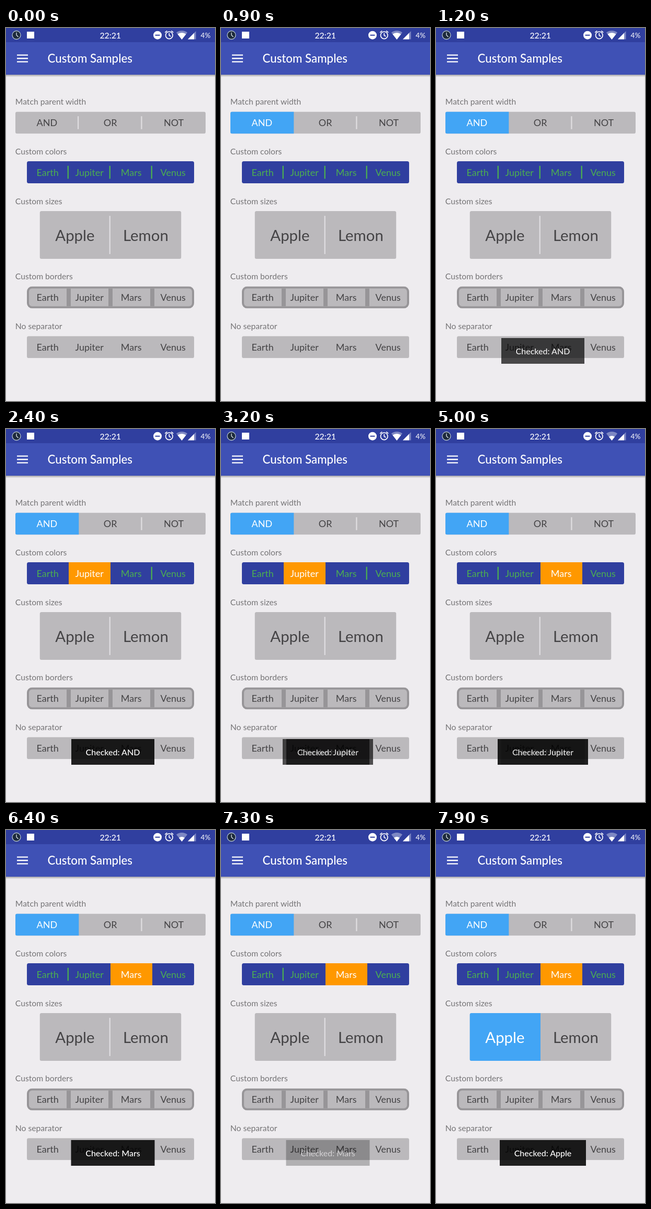
These frames come from a looping animation (400 px wide and 711 px high, 8000 ms). An HTML page:

```html
<!DOCTYPE html>
<html lang="en">
<head>
<meta charset="utf-8">
<title>Custom Samples</title>
<style>
  html, body { margin: 0; width: 100%; height: 100%; overflow: hidden; background: #eeecef; }
  svg { display: block; width: 100vw; height: 100vh; font-family: Lato, sans-serif; }
  .mid { text-anchor: middle; }
</style>
</head>
<body>
<svg viewBox="0 0 400 711">
  <defs>
    <linearGradient id="shade" x2="0" y2="1">
      <stop offset="0" stop-opacity=".3"/>
      <stop offset="1" stop-opacity="0"/>
    </linearGradient>
  </defs>
  <rect width="400" height="711" fill="#eeecef"/>
  <rect y="89" width="400" height="4.5" fill="url(#shade)"/>
  <rect width="400" height="89" fill="#3f51b5"/>
  <rect width="400" height="27" fill="#303f9f"/>

  <!-- status bar -->
  <circle cx="20" cy="13.5" r="8" fill="#1d2a3c" stroke="#b4c4cc" stroke-width="1.3"/>
  <path d="M20 8.5V13.5L23.5 17" fill="none" stroke="#dfe8ea" stroke-width="1.3"/>
  <rect x="40" y="7" width="14" height="13" fill="#fff"/>
  <text class="mid" x="199.7" y="19.5" font-size="15.8" font-weight="500" fill="#fff">22:21</text>
  <circle cx="290" cy="13.7" r="8" fill="#fff"/>
  <path d="M285.5 13.7H294.5" stroke="#303f9f" stroke-width="2"/>
  <g fill="none" stroke="#fff" stroke-width="1.7">
    <circle cx="312.3" cy="13.8" r="6.8"/>
    <path d="M312.3 9.8V14L315.3 16M304.3 8.7L308.3 5.4M316.3 5.4L320.3 8.7"/>
  </g>
  <g fill="#fff">
    <path id="wifiBack" opacity=".38"/>
    <path id="wifi"/>
    <path d="M348 21.5H363.5V6Z" opacity=".38"/>
    <path d="M348 21.5H360V9.5Z"/>
    <text x="372.5" y="18.8" font-size="13.6">4%</text>
  </g>

  <!-- toolbar -->
  <path d="M21 51.7H42M21 58H42M21 64.3H42" stroke="#fff" stroke-width="2.3"/>
  <text x="79.5" y="66" font-size="22.3" font-weight="500" fill="#fff">Custom Samples</text>

  <g id="rows"></g>
  <g id="toasts"></g>
</svg>

<script>
const LOOP = 8000, FADE = 500;
const GREY = { fill: '#bbb9bc', ink: '#444345', line: '#dfdde0', active: '#42a5f5' };
const NAVY = { fill: '#303f9f', ink: '#4caf50', line: '#4caf50', active: '#ff9800' };
const PLANETS = ['Earth', 'Jupiter', 'Mars', 'Venus'];

const rows = [
  { title: 'Match parent width', items: ['AND', 'OR', 'NOT'], x: 18, y: 159.5, w: 364, h: 42, size: 18, ...GREY },
  { title: 'Custom colors', items: PLANETS, x: 40, y: 254, w: 320, h: 42, size: 18, ...NAVY },
  { title: 'Custom sizes', items: ['Apple', 'Lemon'], x: 64.5, y: 349, w: 271, h: 91, size: 29.4, ...GREY },
  { title: 'Custom borders', items: PLANETS, x: 40, y: 492.5, w: 320, h: 42, size: 18, border: 4, ...GREY },
  { title: 'No separator', items: PLANETS, x: 40, y: 587.3, w: 320, h: 42, size: 18, ...GREY, line: 'none' }
];
const taps = [
  { at: 900, row: 0, item: 0 },
  { at: 2400, row: 1, item: 1 },
  { at: 3700, row: 1, item: 2 },
  { at: 7400, row: 2, item: 0 }
];
const toasts = [
  { label: 'AND', width: 159, show: 925, hide: 2940 },
  { label: 'Jupiter', width: 173, show: 2940, hide: 4960 },
  { label: 'Mars', width: 160, show: 4960, hide: 6880 },
  { label: 'Apple', width: 165, show: 7440, hide: LOOP }
];

const byId = id => document.getElementById(id);
const clamp = v => Math.min(1, Math.max(0, v));
const rect = (x, y, w, h, fill, rx = 0) =>
  `<rect x="${x}" y="${y}" width="${w}" height="${h}" rx="${rx}" fill="${fill}"/>`;
const fan = r => `M336.5 22L${336.5 - r * .62} ${22 - r * .785}A${r} ${r} 0 0 1 ${336.5 + r * .62} ${22 - r * .785}Z`;

function drawRow(row, index, selected) {
  const { x, y, w, h, size, items, border } = row;
  const cell = w / items.length;
  const clip = `clip${index}`;
  let out = `<text x="17.8" y="${y - 13.3}" font-size="15.7" fill="#757476">${row.title}</text>`;
  out += `<clipPath id="${clip}">${rect(x, y, w, h, '#000', border ? 10 : 3.5)}</clipPath>`;
  out += `<g clip-path="url(#${clip})">` + rect(x, y, w, h, border ? '#979598' : row.fill);
  if (border) {
    out += rect(x + border, y + border, w - 2 * border, h - 2 * border, row.fill, 6);
  }
  items.forEach((item, i) => {
    const left = x + i * cell;
    if (i === selected) out += rect(left, y, cell, h, row.active);
    if (i && border) {
      out += rect(left - border, y + border, 2 * border, h - 2 * border, '#979598');
    } else if (i && i !== selected && i - 1 !== selected) {
      out += rect(left - 2.4, y + h * .1 + 4.5 * (h < 50), 2.3, h * .8 - 9 * (h < 50), row.line);
    }
  });
  out += '</g>';
  items.forEach((item, i) => {
    out += `<text class="mid" x="${x + (i + .5) * cell - .3}" y="${y + h / 2 + size * .375}"
      font-size="${size}" fill="${i === selected ? '#fff' : row.ink}">${item}</text>`;
  });
  return out;
}

const toastGroups = toasts.map(({ label, width }) => {
  const g = document.createElementNS('http://www.w3.org/2000/svg', 'g');
  g.innerHTML = rect(204.5 - width / 2, 591, width, 49, 'rgba(0,0,0,.87)') +
    `<text class="mid" x="204.5" y="622" font-size="16" font-weight="500" fill="#fff">Checked: ${label}</text>`;
  byId('toasts').append(g);
  return g;
});
byId('wifiBack').setAttribute('d', fan(17));

let drawn = -1;
function render(t) {
  const done = taps.filter(tap => tap.at <= t);
  if (done.length !== drawn) {
    drawn = done.length;
    const selected = {};
    done.forEach(tap => selected[tap.row] = tap.item);
    byId('rows').innerHTML = rows.map((row, i) => drawRow(row, i, selected[i])).join('');
  }
  toasts.forEach(({ show, hide }, i) => {
    const enter = 1 - (1 - clamp((t - show) / FADE)) ** 2;
    const leave = clamp((t - hide) / FADE) ** 2;
    toastGroups[i].setAttribute('opacity', enter * (1 - leave));
  });
  byId('wifi').setAttribute('d', fan(t < 3400 ? 13 : 9));
}

const start = performance.now();
function tick() {
  render((performance.now() - start) % LOOP);
  requestAnimationFrame(tick);
}
tick();
</script>
</body>
</html>
```
